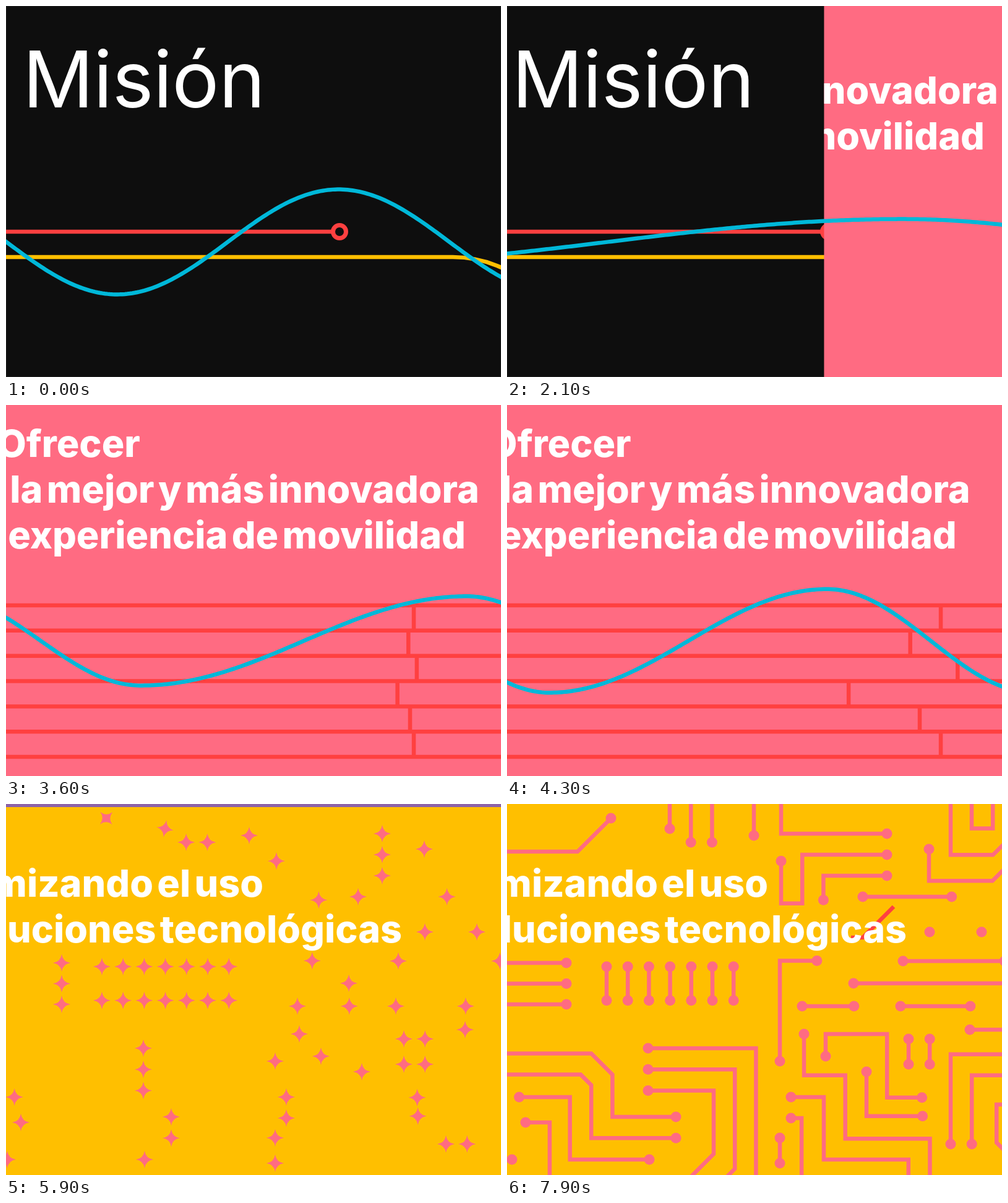
Write an HTML page with a canvas that moves like this. It is 800x600 px and loops after 8 s.

```html
<!DOCTYPE html>
<html lang="es">
<head>
<meta charset="utf-8">
<title>Misión</title>
<style>
html, body { margin: 0; width: 100%; height: 100%; overflow: hidden; background: #0e0e0e; }
canvas { display: block; width: 800px; height: 600px; }
</style>
</head>
<body>
<canvas id="stage" width="800" height="600"></canvas>
<script>
const ctx = document.getElementById('stage').getContext('2d');
const W = 800, H = 600, LOOP = 8, LINE = 6.5;
const DARK = '#0e0e0e', RED = '#ff4040', GOLD = '#ffbf00', CYAN = '#00b8d9',
      PINK = '#ff6b82', PURPLE = '#8d63a8', WHITE = '#fff';
const TITLE = '400 127px Inter, sans-serif';
const BOLD = '800 61px Inter, sans-serif';

const clamp = v => Math.max(0, Math.min(1, v));
const span = (t, start, len) => clamp((t - start) / len);
const mix = (a, b, p) => a + (b - a) * p;
const inOut = p => p < .5 ? 2 * p * p : 1 - 2 * (1 - p) ** 2;
const outCubic = p => 1 - (1 - p) ** 3;
const smooth = p => p * p * (3 - 2 * p);

function text(str, x, y, font, align) {
  ctx.font = font;
  ctx.textAlign = align;
  ctx.fillStyle = WHITE;
  ctx.fillText(str, x, y);
}

function stroke(points, color, width = LINE) {
  ctx.strokeStyle = color;
  ctx.lineWidth = width;
  ctx.beginPath();
  points.forEach(([x, y]) => ctx.lineTo(x, y));
  ctx.stroke();
}

// Strokes only the first part p of a path of the given length
function strokePart(points, len, p, color) {
  ctx.setLineDash([len * p, len + 10]);
  stroke(points, color);
  ctx.setLineDash([]);
}

function fill(color, y = 0) {
  ctx.fillStyle = color;
  ctx.fillRect(0, y, W, H - y);
}

// Runs a scene inside the area right of x and below y
function reveal(x, y, scene) {
  ctx.save();
  ctx.beginPath();
  ctx.rect(x, y, W - x, H - y);
  ctx.clip();
  scene();
  ctx.restore();
}

// ---- Scene 1: title ----
function titleScene(t) {
  const dx = -4.3 * t * t;
  fill(DARK);
  ctx.strokeStyle = '#202020';
  ctx.lineWidth = 1;
  ctx.strokeRect(.5, .5, W - 1, H - 1);
  ctx.letterSpacing = '-0.5px';
  text('Misión', 27 + dx, 164, TITLE, 'left');
  ctx.letterSpacing = '0px';
  stroke([[-10, 365], [529 + dx, 365]], RED);
  ctx.lineWidth = 7;
  ctx.beginPath();
  ctx.arc(539 + dx, 365, 10.5, 0, Math.PI * 2);
  ctx.stroke();
  ctx.strokeStyle = GOLD;
  ctx.lineWidth = LINE;
  ctx.beginPath();
  ctx.moveTo(-10, 406);
  ctx.arc(722 + dx, 596, 190, -Math.PI / 2, -.8);
  ctx.stroke();
}

// ---- Scene 2: tracks ----
const speeds = [60, 2, 92, -115, 20, 60];
const rowY = i => 324 + i * 40.85;

function trackScene(t) {
  const s = t - 2.1;
  const right = 794 - 16.8 * s - 1.71 * s * s;
  fill(PINK);
  const grow = inOut(span(t, 2.2, .5));
  if (grow > 0) {
    for (let i = 0; i < 7; i++) stroke([[0, rowY(i)], [W * grow, rowY(i)]], RED);
  }
  const drop = outCubic(span(t, 2.65, .25));
  if (drop > 0) {
    speeds.forEach((v, i) => {
      const x = 650 + v * (t - 3.45);
      stroke([[x, rowY(i)], [x, mix(rowY(i), rowY(i + 1), drop)]], RED);
    });
  }
  text('Ofrecer', right - 548, 84, BOLD, 'right');
  text('la mejor y más innovadora', right, 158, BOLD, 'right');
  text('experiencia de movilidad', right - 22, 232, BOLD, 'right');
}

// ---- Wave over scenes 1 and 2 ----
// The crest always travels left; its slopes stretch while the wave flattens
const poses = [
  { at: 0, crest: 538, rise: 358, fall: 358 },
  { at: .8, crest: 215, rise: 422, fall: 326 },
  { at: 2.1, crest: 640, rise: 953, fall: 705 },
  { at: 3.6, crest: 745, rise: 527, fall: 323 },
  { at: 5, crest: 290, rise: 370, fall: 348 },
  { at: 6, crest: -35, rise: 370, fall: 348 }
];

function wave(t) {
  const next = Math.max(1, poses.findIndex(pose => pose.at > t));
  const a = poses[next - 1], b = poses[next];
  const p = span(t, a.at, b.at - a.at);
  const from = b.crest > a.crest ? a.crest + a.rise + a.fall : a.crest;
  const crest = mix(from, b.crest, p);
  const rise = mix(a.rise, b.rise, p), fall = mix(a.fall, b.fall, p);
  const period = rise + fall;
  const amp = 85 - 55 * Math.exp(-((t - 2.45) ** 2) / .91);
  const points = [];
  for (let x = -8; x <= W + 8; x += 4) {
    const d = (((x - crest) % period) + period) % period;
    const angle = d < fall ? d / fall : (period - d) / rise;
    points.push([x, 381.5 - amp * Math.cos(Math.PI * angle)]);
  }
  stroke(points, CYAN);
}

// ---- Scene 3: circuit ----
const CELL = 34.2;
const traces = [];

// Lays a trace by compass steps counted in cells, with 0, 1 or 2 end dots
function walk(x, y, route, dots = 1) {
  const points = [[x, y]];
  let len = 0;
  for (const [, dir, cells] of route.matchAll(/([NSEW]+)([\d.]+)/g)) {
    const dx = (dir.includes('E') - dir.includes('W')) * cells * CELL;
    const dy = (dir.includes('S') - dir.includes('N')) * cells * CELL;
    points.push([x += dx, y += dy]);
    len += Math.hypot(dx, dy);
  }
  traces.push({ points, len, dots });
}

function repeat(n, lay) {
  for (let i = 0; i < n; i++) lay(i, i * CELL);
}

function layTop() {
  walk(168, 23, 'SW1.58 W4');
  repeat(3, (i, d) => walk(263 + d, i ? 62 : 40, 'N3'));
  walk(399, 51, 'N3');
  walk(614, 48, 'W5 N2');
  walk(614, 82, 'W4 S2.3 W1 N2', 2);
  walk(614, 116, 'W3 S1.15', 2);
  walk(575, 150, 'E4.2', 2);
  walk(682, 73, 'S1.5 E3 NE1');
  walk(717, -10, 'S2.7 E2 NE1', 0);
  walk(751, -10, 'S1.45 E1 N2', 0);
  repeat(2, i => walk(683 + 84 * i, 207, ''));
}

function layLeft() {
  repeat(3, i => walk(96, 257 + 33.5 * i, 'W4'));
  repeat(7, (i, d) => walk(161 + d, 263, 'S1.6', 2));
  repeat(3, (i, d) => walk(228, 395 + d, `E${5.1 - i} S${6.4 - 1.7 * i} SW3`));
  repeat(2, (i, d) => walk(273, 506 + d, `W${3 + i} N${2 + i / 2} NW${1 - i / 2} W5`));
  walk(230, 575, 'W3.75 N2.95 W2.4', 2);
  walk(30, 515, 'E1.14 S3');
  walk(8, 575, '');
}

function layRight() {
  walk(441, 416, 'N4.75 E1.75', 2);
  walk(640, 254, 'E4.8', 2);
  walk(560, 290, 'E8');
  walk(477, 327, 'E2.45', 2);
  walk(636, 327, 'E3.3', 2);
  walk(748, 365, 'E2');
  walk(480, 372, 'S1.95 E1.95 S3 E4 S3');
  walk(515, 408, 'N1.05 E2.9 S3 E1.65', 2);
  walk(581, 433, 'S2.1 E2.65', 2);
  repeat(2, (i, d) => walk(649 + d, 380, 'S1.2', 2));
  repeat(2, (i, d) => walk(717 + d, 550, `N${4.25 - i} E4`));
  walk(810, 486, 'W0.55 S1.8 SE1', 0);
  walk(459, 474, 'E1.55 S2.95 E4 S2');
  walk(459, 508, 'E0.5 S3');
  walk(441, 540, 'S1.2', 2);
}

layTop();
layLeft();
layRight();

// Four-pointed star that spins and then swells into a disc
function node([x, y], age) {
  const turn = smooth(span(age, 0, .1)) * Math.PI / 2;
  const swell = smooth(span(age, .08, .16));
  const r = mix(14, 8.5, swell);
  ctx.save();
  ctx.translate(x, y);
  ctx.rotate(turn);
  ctx.fillStyle = PINK;
  ctx.beginPath();
  ctx.moveTo(r, 0);
  for (let k = 1; k <= 4; k++) {
    const a = k * Math.PI / 2, m = a - Math.PI / 4;
    ctx.quadraticCurveTo(2.6 * Math.cos(m), 2.6 * Math.sin(m), r * Math.cos(a), r * Math.sin(a));
  }
  ctx.fill();
  ctx.beginPath();
  ctx.arc(0, 0, 8.5 * swell, 0, Math.PI * 2);
  ctx.fill();
  ctx.restore();
}

function circuitScene(t) {
  fill(GOLD);
  ctx.save();
  ctx.translate(3 * (t - 7.9), 0);
  traces.forEach(({ points, len, dots }, i) => {
    const age = t - 5.85 - i * .03;
    const grow = inOut(span(age, .15, .4));
    if (grow > 0 && len > 0) strokePart(points, len, grow, PINK);
    if (dots > 0) node(points[0], age);
    if (dots > 1) node(points[points.length - 1], age);
  });
  const spark = span(t, 7.75, .15);
  if (spark > 0) strokePart([[556, 216], [575, 216], [625, 166]], 90, spark, RED);
  text('Optimizando el uso', 422, 150, BOLD, 'right');
  text('de soluciones tecnológicas', 646, 224, BOLD, 'right');
  ctx.restore();
}

function draw(t) {
  const edge = W * (1 - inOut(span(t, 1.8, .71)));
  const purpleY = H * (1 - outCubic(span(t, 5.42, .4)));
  const goldY = H * (1 - outCubic(span(t, 5.55, .44)));
  ctx.wordSpacing = '-7px';
  if (goldY > 0) {
    if (edge > 0) titleScene(t);
    if (edge < W) reveal(edge, 0, () => trackScene(t));
    wave(t);
    if (purpleY < H) fill(PURPLE, purpleY);
  }
  if (goldY < H) reveal(0, goldY, () => circuitScene(t));
}

const begin = performance.now();
function frame() {
  draw(((performance.now() - begin) / 1000) % LOOP);
  requestAnimationFrame(frame);
}
frame();
</script>
</body>
</html>
```
